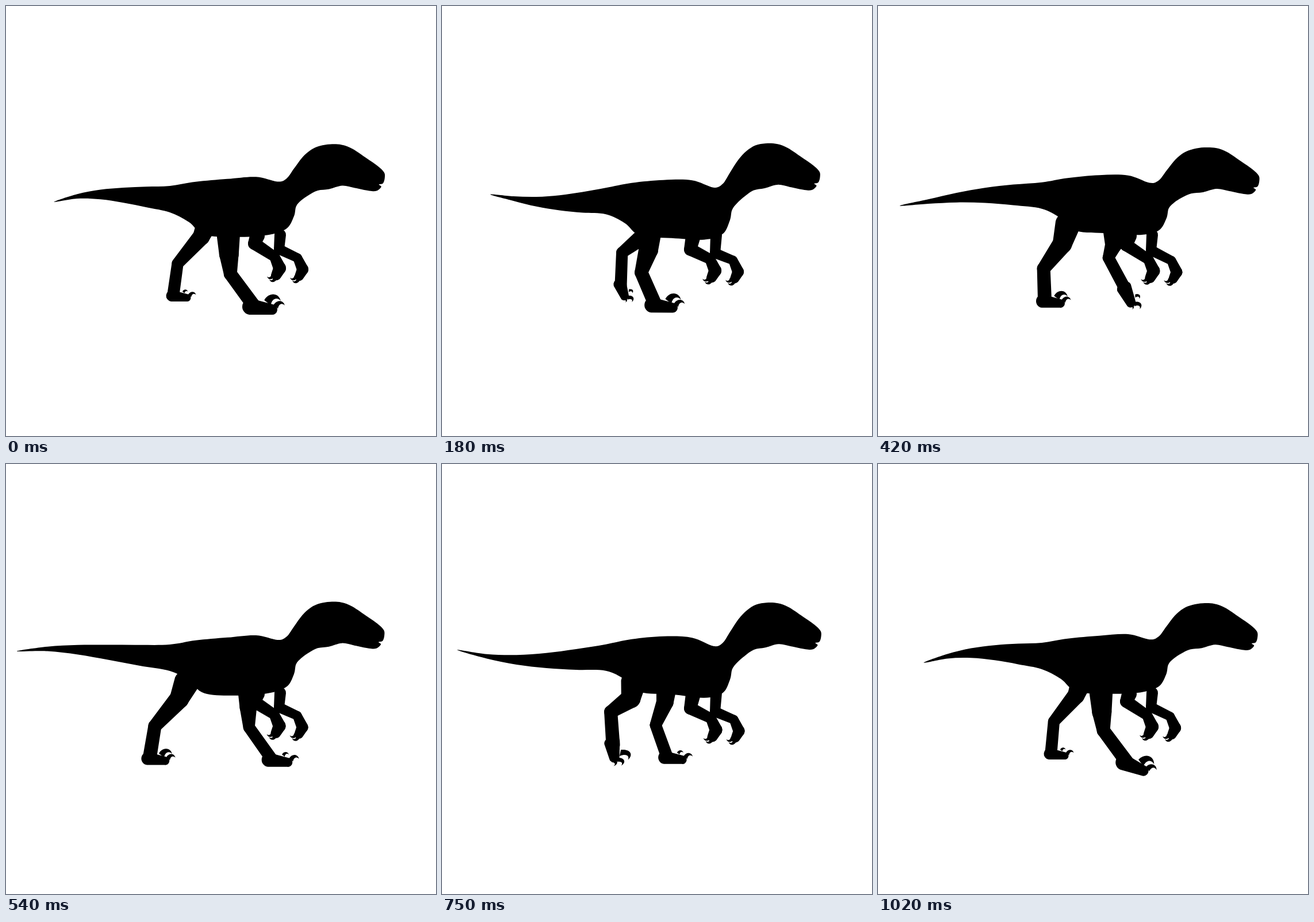
These frames come from a looping animation (748 px wide and 748 px high, 1.05 s). An HTML page with a canvas:

```html
<!DOCTYPE html>
<html lang="en">
<head>
<meta charset="utf-8">
<title>Walking raptor</title>
<style>
html, body { margin: 0; width: 100%; height: 100%; overflow: hidden; background: #fff; }
canvas { display: block; }
</style>
</head>
<body>
<canvas id="stage" width="748" height="748"></canvas>
<script>
const ctx = document.getElementById('stage').getContext('2d');
const LOOP = 1050, STEP = 30, STANCE = .6;
const { PI, sin, cos } = Math;

// Back, head, chest and belly at rest, clockwise from the root of the tail.
const TORSO = [330,304, 385,299, 435,299, 472,311, 488,306, 501,288, 516,267, 531,253, 547,245,
  565,242, 585,243, 604,250, 628,266, 648,280, 659,291, 660,301, 657,310, 650,312, 654,316,
  646,323, 633,323, 608,318, 586,314, 563,320, 543,323, 527,332, 514,342, 505,353, 501,371,
  488,393, 456,402, 400,400, 345,396, 318,374];

const mix = (a, b, k) => a + (b - a) * k;
const ramp = (a, b, x) => Math.min(1, Math.max(0, (x - a) / (b - a)));

// Smooth closed shape through a flat list of points.
function blob(p) {
  const n = p.length;
  const x = i => p[(i + n) % n], y = i => p[(i + 1 + n) % n];
  ctx.beginPath();
  ctx.moveTo(p[0], p[1]);
  for (let i = 0; i < n; i += 2) {
    ctx.bezierCurveTo(
      x(i) + (x(i + 2) - x(i - 2)) / 6, y(i) + (y(i + 2) - y(i - 2)) / 6,
      x(i + 2) - (x(i + 4) - x(i)) / 6, y(i + 2) - (y(i + 4) - y(i)) / 6,
      x(i + 2), y(i + 2));
  }
  ctx.fill();
}

// Chain of tapered capsules through [x, y, radius] joints.
function limb(...joints) {
  joints.slice(1).forEach(([x2, y2, r2], i) => {
    const [x1, y1, r1] = joints[i];
    const a = Math.atan2(y2 - y1, x2 - x1), q = PI / 2;
    ctx.beginPath();
    ctx.arc(x1, y1, r1, a + q, a - q);
    ctx.arc(x2, y2, r2, a - q, a + q);
    ctx.fill();
  });
}

// Crescent that starts at x, y and hooks over to its tip.
function claw(x, y, length, angle = 0) {
  ctx.save();
  ctx.translate(x, y);
  ctx.rotate(angle);
  ctx.scale(length, length);
  ctx.beginPath();
  ctx.moveTo(-.15, -.05);
  ctx.bezierCurveTo(.15, -.6, .85, -.6, 1, 0);
  ctx.bezierCurveTo(.8, -.25, .4, -.25, .3, .3);
  ctx.fill();
  ctx.restore();
}

function torsoAndTail(w, pitch, bob) {
  const sway = cos(w - .55);
  const tail = (u, side) => [
    mix(285, 52 + 37 * sway, u),
    335 + (6 + 10 * u * u) * cos(2 * w - 1.4 - 3.3 * u) + 7 * u * u * sway
      + side * 23 * (1 - u) ** 1.1];
  const steps = [0, .2, .4, .6, .8];
  const torso = TORSO.map((v, i) => {
    const x = TORSO[i - i % 2];
    if (i % 2 === 0) return v + 4 * pitch * ramp(480, 600, x);
    const trunk = mix(-6 * pitch, 6.5 * bob, ramp(400, 480, x));
    return v + mix(trunk, 5 * pitch, ramp(480, 550, x));
  });
  blob([...tail(1, 0), ...steps.toReversed().flatMap(u => tail(u, -1)),
    ...torso, ...steps.flatMap(u => tail(u, 1))]);
}

// The foot slides back on the ground, then swings forward; the joints follow it.
function leg(phase, size) {
  const s = (phase + .02) % 1;
  const swing = ramp(STANCE, 1, s), lift = sin(PI * swing);
  const x = s < STANCE ? mix(440, 230, s / STANCE) : mix(230, 440, swing);
  const y = 515 + 5 * cos(2 * PI * phase) - 29 * lift;
  limb(
    [213 + .4 * x, 380, 22 * size],
    [180 + .48 * x + 5 * lift, 421 + .13 * (x - 350) - 8 * lift, 17 * size],
    [x - .27 * (x - 275), y - 54 - 4 * lift, 11.5 * size],
    [x - 3, y, 12 * size]);

  const scale = size * (.9 + .1 * cos(2 * PI * phase));
  ctx.save();
  ctx.translate(x, y);
  ctx.rotate(1.35 * lift ** .6);
  ctx.scale(scale * (1 - .2 * lift), scale * (1 + .15 * lift));
  limb([-8, 3, 14], [30, 8, 9]);
  claw(20, -7, size < 1 ? 12 : 25, -.3 * lift);
  claw(35, 1, 17);
  claw(34, 10, 16 * lift, .3);
  ctx.restore();
}

function arms(pitch, bob) {
  const dx = 3 * pitch, dy = 3 * pitch + 3 * bob;
  const arm = (shoulder, elbow, x, y, r) => {
    limb(shoulder, elbow, [x, y, r - 2], [x + 9, y + 20, r], [x + 3, y + 32, r - 2]);
    claw(x - 2, y + 34, -11);
    claw(x + 2, y + 39, -11);
  };
  arm([437, 400, 13], [432, 419 + 6 * bob, 11], 468 + dx, 440 + dy, 11);
  arm([477, 398, 10], [475, 427 + 4 * bob, 9], 508 + dx, 442 + dy, 10);
}

function draw(t) {
  const phase = t / LOOP, w = 2 * PI * phase;
  const pitch = cos(2 * w - 4.4), bob = -cos(2 * w + .24);
  ctx.fillStyle = '#fff';
  ctx.fillRect(0, 0, 748, 748);
  ctx.fillStyle = '#000';
  torsoAndTail(w, pitch, bob);
  ctx.save();
  ctx.translate(36, -8);
  leg((phase + .5) % 1, .88);
  ctx.restore();
  leg(phase, 1);
  arms(pitch, bob);
}

const start = performance.now();
function tick() {
  const t = Math.max(0, performance.now() - start) % LOOP;
  draw(Math.floor(t / STEP) * STEP);
  requestAnimationFrame(tick);
}
tick();
</script>
</body>
</html>
```
